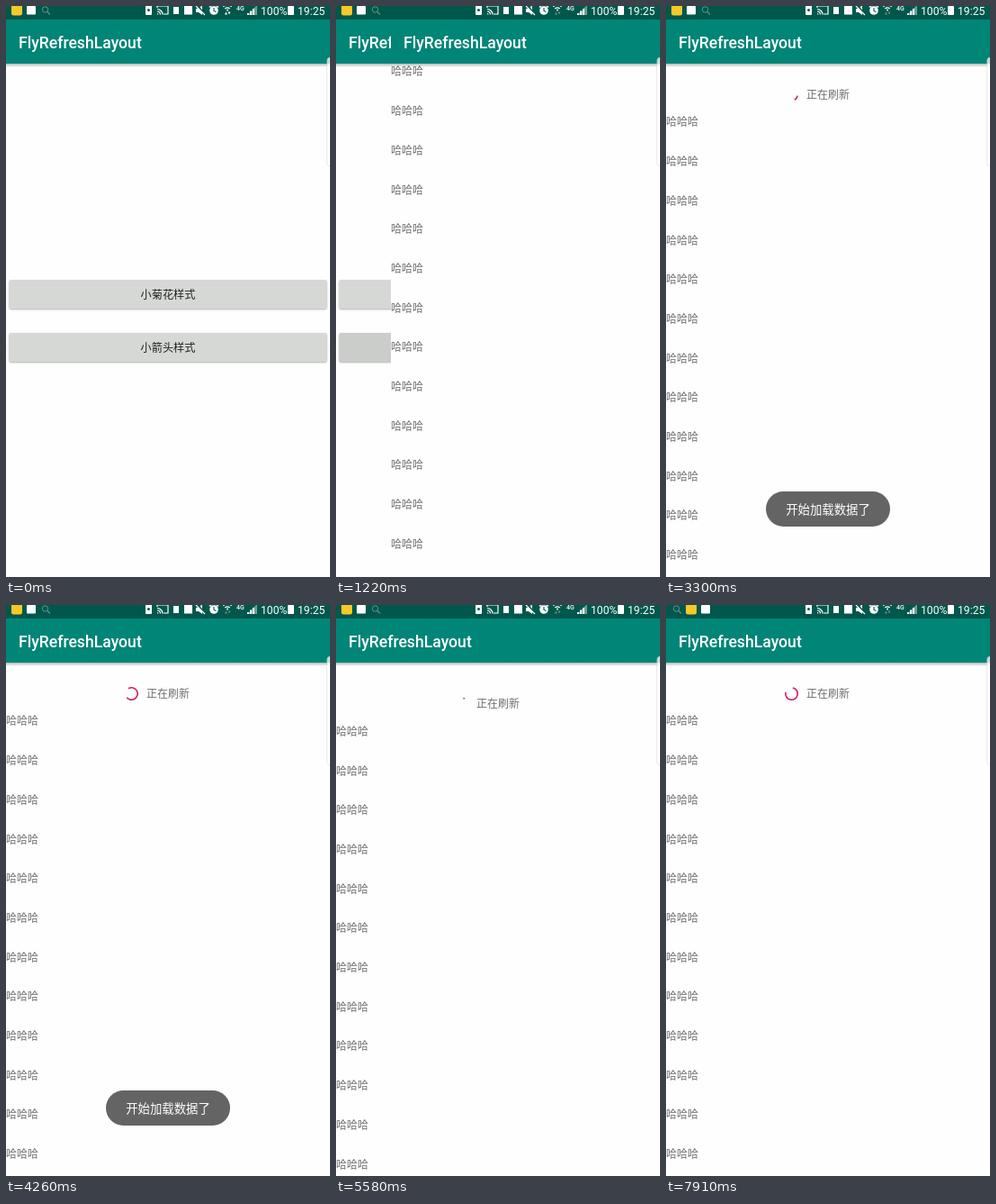
An HTML page with a canvas for the animation above (8000 ms loop, 360 by 634 pixels).

```html
<!DOCTYPE html>
<html lang="zh">
<head>
<meta charset="utf-8">
<style>
html, body { margin: 0; width: 100%; height: 100%; overflow: hidden; background: #fefefe; }
canvas { display: block; width: 360px; height: 634px; }
</style>
</head>
<body>
<canvas id="stage"></canvas>
<script>
const W = 360, H = 634, LOOP = 8000, STATUS = 15, BAR = 64, ROW = 43.7, OPEN = 56;
const PAGE = '#fefefe', PRIMARY = '#008577', DARK = '#00574b', ACCENT = '#d01b60';
const CJK = '"Noto Sans CJK SC", "Noto Sans CJK", sans-serif';
const ROBOTO = 'Roboto, sans-serif';

const canvas = document.getElementById('stage');
const dpr = window.devicePixelRatio || 1;
canvas.width = W * dpr;
canvas.height = H * dpr;
const g = canvas.getContext('2d');

const clamp = v => Math.min(1, Math.max(0, v));
const span = (t, a, b) => clamp((t - a) / (b - a));
const mix = (a, b, p) => a + (b - a) * p;

// cubic-bezier(.4, 0, .2, 1)
function ease(x) {
  let lo = 0, hi = 1;
  for (let i = 0; i < 20; i++) {
    const m = (lo + hi) / 2, n = 1 - m;
    if (1.2 * n * n * m + 0.6 * n * m * m + m ** 3 < x) lo = m; else hi = m;
  }
  return 3 * (1 - lo) * lo * lo + lo ** 3;
}

function box(x, y, w, h, color, r = 0) {
  g.fillStyle = color;
  g.beginPath();
  g.roundRect(x, y, w, h, r);
  g.fill();
}

function poly(color, ...pts) {
  g.fillStyle = color;
  g.beginPath();
  for (let i = 0; i < pts.length; i += 2) g.lineTo(pts[i], pts[i + 1]);
  g.fill();
}

function line(color, width, ...pts) {
  g.strokeStyle = color;
  g.lineWidth = width;
  g.beginPath();
  for (let i = 0; i < pts.length; i += 2) g.lineTo(pts[i], pts[i + 1]);
  g.stroke();
}

function arc(x, y, r, a, b, color, width) {
  g.strokeStyle = color;
  g.lineWidth = width;
  g.beginPath();
  g.arc(x, y, r, a, b);
  g.stroke();
}

function label(str, x, y, size, color, align = 'left', family = CJK, weight = 400) {
  g.font = `${weight} ${size}px ${family}`;
  g.textAlign = align;
  g.fillStyle = color;
  g.fillText(str, x, y + size * 0.37);
}

function appBar() {
  const shade = g.createLinearGradient(0, BAR, 0, BAR + 4);
  shade.addColorStop(0, 'rgba(0,0,0,.28)');
  shade.addColorStop(1, 'rgba(0,0,0,0)');
  box(0, BAR, W, 4, shade);
  box(0, 0, W, BAR, PRIMARY);
  label('FlyRefreshLayout', 14, 40, 17.6, '#fff', 'left', ROBOTO, 500);
}

function button(str, y, press) {
  g.save();
  g.shadowColor = 'rgba(0,0,0,.3)';
  g.shadowBlur = 2 * dpr;
  g.shadowOffsetY = dpr;
  const c = Math.round(mix(214, 203, press));
  box(3.5, y - 16, 353, 32, `rgb(${c},${c + 2},${c})`, 2);
  g.restore();
  label(str, 180, y, 12.2, '#212121', 'center');
}

function home(t) {
  box(0, 0, W, H, PAGE);
  button('小菊花样式', 320, 0);
  button('小箭头样式', 379, span(t, 610, 850));
  appBar();
}

function spinner(ms, y) {
  const p = ms / 1333 % 1;
  const end = 0.75 * ease(clamp(p * 2)) + 0.01;
  const start = 0.75 * ease(clamp(p * 2 - 1));
  const turn = p * 0.25 + ms / 4444 * 2 - 0.25;
  const tau = Math.PI * 2;
  arc(139.5, y, 6.7, (start + turn) * tau, (end + turn) * tau, ACCENT, 1.6);
}

function pull(t) {
  if (t < 1980) return 0;
  if (t < 5000) return OPEN * (1 - ease(span(t, 4390, 4640)));
  if (t < 5490) return (t - 5000) * 0.15;
  return mix(73.5, OPEN, ease(span(t, 5490, 5800)));
}

function list(t) {
  const dy = pull(t);
  box(0, 0, W, H, PAGE);
  for (let i = 0; i < 14; i++) label('哈哈哈', 0, 73 + dy + i * ROW, 12, '#6f6f6f');
  if (dy > 0) label('正在刷新', 180, 42.5 + dy, 12, '#6f6f6f', 'center');
  if (t >= 2300 && t < 4640) spinner((t - 2060) * 0.83, 42.5 + dy);
  if (t >= 5490) spinner((t - 5490) * 0.83, 42.5 + dy);
  appBar();
}

function toast(t) {
  g.globalAlpha = span(t, 2250, 2700) * (1 - span(t, 4340, 4840));
  box(111, 539, 138, 39, '#646464', 19.5);
  label('开始加载数据了', 180, 559, 13.4, '#fff', 'center');
  g.globalAlpha = 1;
}

function magnifier(x, alpha) {
  const c = `rgba(255,255,255,${alpha})`;
  arc(x + 4.5, 4, 3.2, 0, 7, c, 1);
  line(c, 1.2, x + 7, 6.5, x + 10, 9.5);
}

function statusBar(t) {
  const w = '#fff';
  box(0, 0, W, STATUS, DARK);

  const move = ease(span(t, 7050, 7400));
  box(6 + 16 * move, -2, 12, 12.5, '#f6c927', 2.5);
  box(23 + 16 * move, 0, 10, 9.5, w, 1);
  if (move < 0.5) magnifier(39, 0.35 * (1 - move * 2));
  else magnifier(7, 0.35 * (move * 2 - 1));

  // battery saver, cast, two marks
  box(155, -1, 7, 11, w, 1);
  box(157, 3, 3, 3, DARK, 1.5);
  line(w, 1.2, 168, 2, 168, 0, 180, 0, 180, 9, 175, 9);
  for (const r of [1, 3.5, 6]) arc(168, 9.5, r, -Math.PI / 2, 0, w, 1.2);
  box(186, 1, 6, 8, w);
  box(198, 0, 9, 9.5, w);

  // muted speaker
  poly(w, 211, 3, 214, 3, 218, -1, 218, 10, 214, 7, 211, 7);
  line(DARK, 2, 211, -2, 221, 9);
  line(w, 1.2, 211, 0, 221, 10);

  // alarm
  g.fillStyle = w;
  g.beginPath();
  g.arc(231, 5, 4.8, 0, 7);
  g.fill();
  line(w, 1.5, 226, 1.5, 229, -1);
  line(w, 1.5, 236, 1.5, 233, -1);
  line(DARK, 1.1, 231, 2, 231, 5.5, 233.5, 6.5);

  // wireless with traffic arrows
  for (const r of [4, 7]) arc(246, 6, r, -2.3, -0.84, w, 1.2);
  box(245, 3.5, 2, 2, w, 1);
  const up = t < 90 || (t > 3400 && t < 4200) || (t > 6400 && t < 7100);
  poly(up ? w : '#5f938b', 243, 9.5, 244.5, 6.5, 246, 9.5);
  poly(t < 90 ? w : '#5f938b', 246.5, 6.5, 249.5, 6.5, 248, 9.5);

  label('4G', 256, 2, 7, w, 'left', ROBOTO, 500);
  poly('#6f9d96', 268, 10, 279, -1, 279, 10);
  for (let i = 0; i < 3; i++) box(268 + i * 3, 8 - i * 2.5, 2, 2 + i * 2.5, w);
  label('100%', 283, 5, 12.2, w, 'left', ROBOTO);
  box(313, 0, 7, 10, w, 1);
  box(315, -1, 3, 2, w);
  label('19:25', 324, 5, 12.2, w, 'left', ROBOTO);
}

function edgeHandle() {
  box(356.5, 57, 8, 121, 'rgba(255,255,255,.75)', 4);
  g.strokeStyle = 'rgba(120,120,120,.15)';
  g.lineWidth = 1;
  g.stroke();
}

function draw(t) {
  g.setTransform(dpr, 0, 0, dpr, 0, 0);
  const slide = ease(span(t, 990, 1410));
  if (slide < 1) home(t);
  if (slide > 0) {
    g.save();
    g.translate(Math.round(W * (1 - slide)), 0);
    list(t);
    g.restore();
  }
  if (t > 2250 && t < 4840) toast(t);
  statusBar(t);
  edgeHandle();
}

const begin = performance.now();
function tick() {
  draw((performance.now() - begin) % LOOP);
  requestAnimationFrame(tick);
}
tick();
</script>
</body>
</html>
```
